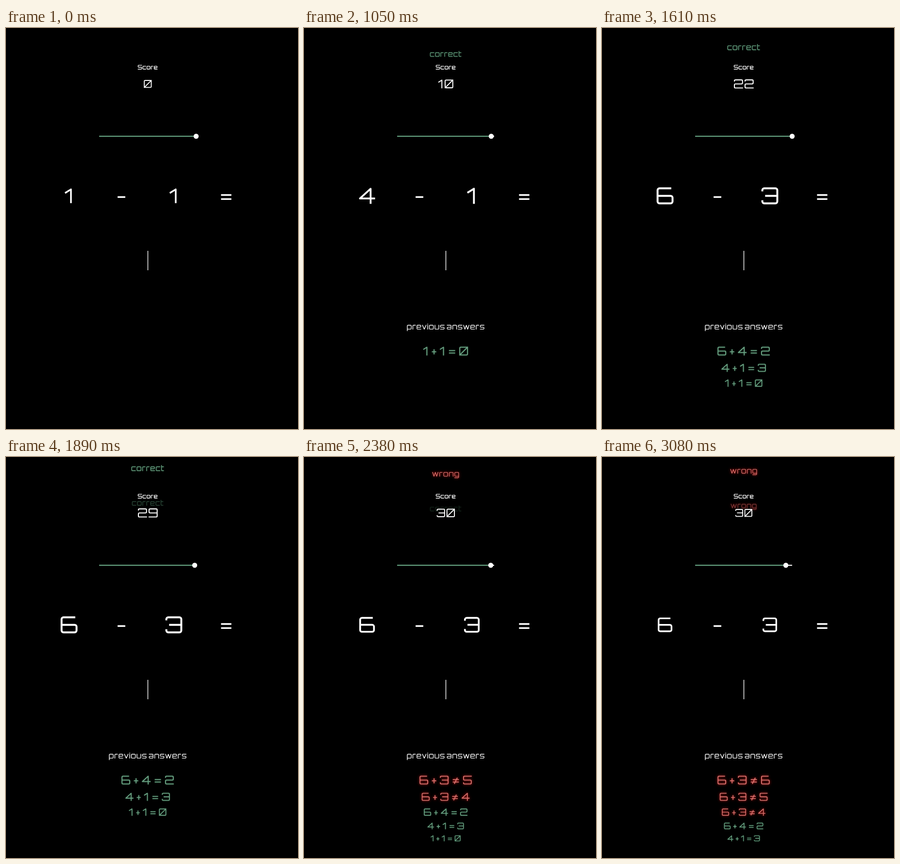
An HTML page with a canvas that plays this animation: 602x826 px, repeating every 3150 ms.

```html
<!DOCTYPE html>
<html lang="en">
<head>
<meta charset="utf-8">
<title>Arithmetic game</title>
<style>
html, body { margin: 0; width: 100%; height: 100%; overflow: hidden; background: #000; }
canvas { display: block; }
</style>
</head>
<body>
<canvas id="stage" width="602" height="826" role="img" aria-label="Arithmetic game with score, timer and previous answers"></canvas>
<script>
const ctx = document.getElementById('stage').getContext('2d');
const LOOP = 3150, STEP = 70;
const WHITE = '#fff', GREEN = '#6a9f82', RED = '#d2706c';
const GLOW = { [GREEN]: ['rgba(46,139,87,.5)', 2], [RED]: ['rgba(255,0,0,.75)', 5] };

// Square lettering on a named grid: column letter + row letter, in ems.
const STROKE = 0.082, GAP = 0.12, RADIUS = 0.08;
const COLS = { l: 0, n: 0.25, m: 0.5, k: 0.75, e: 0.85, r: 1 };
const ROWS = { t: 0.04, u: 0.05, y: 0.13, q: 0.2, x: 0.2, s: 0.25, i: 0.32, c: 0.36, g: 0.42,
               h: 0.44, v: 0.48, j: 0.52, z: 0.59, f: 0.64, b: 0.68, d: 0.86 };
// character: [ink width, strokes, left bearing, right bearing]
const GLYPHS = {
  0: [0.72, 'mt rt rb lb lt mt|lb rt'],
  1: [0.34, 'lq rt rb', 0, 0.07],
  2: [0.72, 'ly lt rt rc lc lb rb'],
  3: [0.72, 'ly lt rt rb lb lz|nc rc'],
  4: [0.72, 'kb kt lv rv'],
  5: [0.72, 'rt lt lc rc rb lb lz'],
  6: [0.72, 'et lt lb rb rc lc'],
  7: [0.65, 'lt rt rb'],
  8: [0.72, 'mt rt rb lb lt mt|lc rc'],
  9: [0.72, 'rc lc lt rt rb lb'],
  '+': [0.36, 'lg rg|ms mz'],
  '-': [0.38, 'lg rg'],
  '=': [0.51, 'li ri|lj rj', 0.04, 0.04],
  '≠': [0.51, 'li ri|lj rj|nf kq', 0.04, 0.04],
  ' ': [0.06, ''],
  S: [0.66, 'rt lt lc rc rb lb'],
  a: [0.55, 'lx rx rb lb lh rh'],
  c: [0.53, 'rx lx lb rb'],
  e: [0.55, 'rb lb lx rx rh lh'],
  g: [0.56, 'rb lb lx rx rd ld'],
  i: [0.085, 'lx lb|lt lu'],
  n: [0.55, 'lb lx rx rb'],
  o: [0.56, 'mx rx rb lb lx mx'],
  p: [0.56, 'ld lx rx rb lb'],
  r: [0.38, 'lb lx rx'],
  s: [0.53, 'rx lx lh rh rb lb'],
  t: [0.33, 'lt lb rb|lx rx'],
  u: [0.55, 'lx lb rb rx'],
  v: [0.52, 'lx mb rx'],
  w: [0.75, 'lx nb mx kb rx']
};

function tracePath(points) {
  points.forEach(([x, y], i) => {
    const a = points[i - 1], b = points[i + 1];
    if (!a) return ctx.moveTo(x, y);
    const square = b && (x - a[0]) * (b[0] - x) + (y - a[1]) * (b[1] - y) === 0;
    if (square) ctx.arcTo(x, y, b[0], b[1], RADIUS);
    else ctx.lineTo(x, y);
  });
}

function textWidth(text) {
  return [...text].reduce((sum, ch) => {
    const [w, , left = 0, right = 0] = GLYPHS[ch];
    return sum + w + left + right + GAP;
  }, -GAP);
}

// Centres text on (cx, cy), where cy is the middle of the capital height.
function write(text, cx, cy, em, color = WHITE, alpha = 1) {
  if (!text || alpha <= 0.01) return;
  ctx.save();
  ctx.globalAlpha = alpha;
  ctx.strokeStyle = color;
  if (GLOW[color]) [ctx.shadowColor, ctx.shadowBlur] = GLOW[color];
  ctx.translate(cx - textWidth(text) * em / 2, cy - 0.36 * em);
  ctx.scale(em, em);
  ctx.lineWidth = Math.max(STROKE, 1.4 / em);
  ctx.lineCap = 'square';
  ctx.lineJoin = 'round';
  ctx.beginPath();
  let pen = 0;
  for (const ch of text) {
    const [w, strokes, left = 0, right = 0] = GLYPHS[ch];
    const x0 = pen + left + STROKE / 2;
    for (const stroke of strokes ? strokes.split('|') : [])
      tracePath(stroke.split(' ').map(([c, r]) => [x0 + COLS[c] * (w - STROKE), ROWS[r]]));
    pen += left + w + right + GAP;
  }
  ctx.stroke();
  ctx.restore();
}

function line(x1, x2, y, width, color) {
  ctx.fillStyle = color;
  ctx.fillRect(x1, y - width / 2, x2 - x1, width);
}

// Critically damped spring from 0 to 1.
function spring(ms) {
  const x = Math.max(0, ms) * 0.013;
  return 1 - (1 + x) * Math.exp(-x);
}

// [time, a, b, answer]; every task is a - b
const ANSWERS = [
  [350, 1, 1, 0], [1185, 4, 1, 3], [1540, 6, 4, 2],
  [1960, 6, 3, 4], [2315, 6, 3, 5], [2710, 6, 3, 6]
];
const MESSAGES = [
  [500, 'correct'], [1000, ''], [1270, 'correct'], [1700, 'correct'],
  [2110, 'wrong'], [2385, 'wrong'], [2860, 'wrong']
];
const isRight = ([, a, b, answer]) => a - b === answer;
const tint = text => text === 'wrong' ? RED : GREEN;

function drawMessages(t) {
  const i = MESSAGES.findLastIndex(([start]) => start <= t);
  if (i < 0) return;
  const [start, text] = MESSAGES[i], p = spring(t - start);
  if (i > 0) {
    const [before, old] = MESSAGES[i - 1];
    const y = -28 + 72 * spring(start - before);
    const alpha = (1 - p) ** (old === 'wrong' ? 0.45 : 0.85);
    write(old, 292, y + (116 - y) * p, 16.2, tint(old), alpha);
  }
  write(text, 292, -28 + 72 * p, 16.8, tint(text), Math.min(1, p * 1.8));
}

function drawHistory(past) {
  if (!past.length) return;
  write('previous answers', 292, 615, 16.9);
  past.slice(-5).reverse().forEach((entry, i) => {
    const [, a, b, answer] = entry, ok = isRight(entry);
    write(`${a} + ${b} ${ok ? '=' : '≠'} ${answer}`, 292,
      665.5 + 36 * i - 1.5 * i * i, 25 * (1 - i / 12), ok ? GREEN : RED);
  });
}

function draw(t) {
  ctx.fillStyle = '#000';
  ctx.fillRect(0, 0, 602, 826);

  const past = ANSWERS.filter(([time]) => time <= t);
  const next = ANSWERS[past.length];
  const solved = past.filter(isRight);
  const age = solved.length ? t - solved.at(-1)[0] : 0;
  const pop = solved.length ? 1 + 0.16 * Math.min(1, Math.max(0, (1190 - age) / 790)) : 1;

  drawMessages(t);
  write('Score', 292, 80.7, 12.7);
  const score = solved.length ? Math.round(10 * (solved.length - 1 + spring(age))) : 0;
  write(String(score), 292.3, 115.2, 22.5 * pop);

  // Timer
  const knob = 392 - Math.floor(age / 116);
  line(knob, 392, 223, 2, WHITE);
  line(192, knob, 223, 2.2, '#66a382');
  ctx.fillStyle = WHITE;
  ctx.beginPath();
  ctx.arc(knob, 223, 5.2, 0, 7);
  ctx.fill();

  // Task
  const [, a, b] = next || ANSWERS.at(-1);
  write(String(a), 130, 345.7, 41.7 * pop);
  write('-', 238, 345.7, 41.7);
  write(String(b), 346, 345.7, 41.7 * pop);
  write('=', 454, 345.7, 41.7);

  // Input
  const typed = next && next[0] - t <= 65 ? String(next[3]) : '';
  if (typed) write(typed, 292, 479, 32);
  ctx.fillStyle = WHITE;
  ctx.fillRect(typed ? 305 : 291.8, 459, 1.4, 40);

  drawHistory(past);
}

const begin = performance.now();
function frame() {
  const t = (performance.now() - begin) % LOOP;
  draw(Math.floor(t / STEP) * STEP);
  requestAnimationFrame(frame);
}
frame();
</script>
</body>
</html>
```
